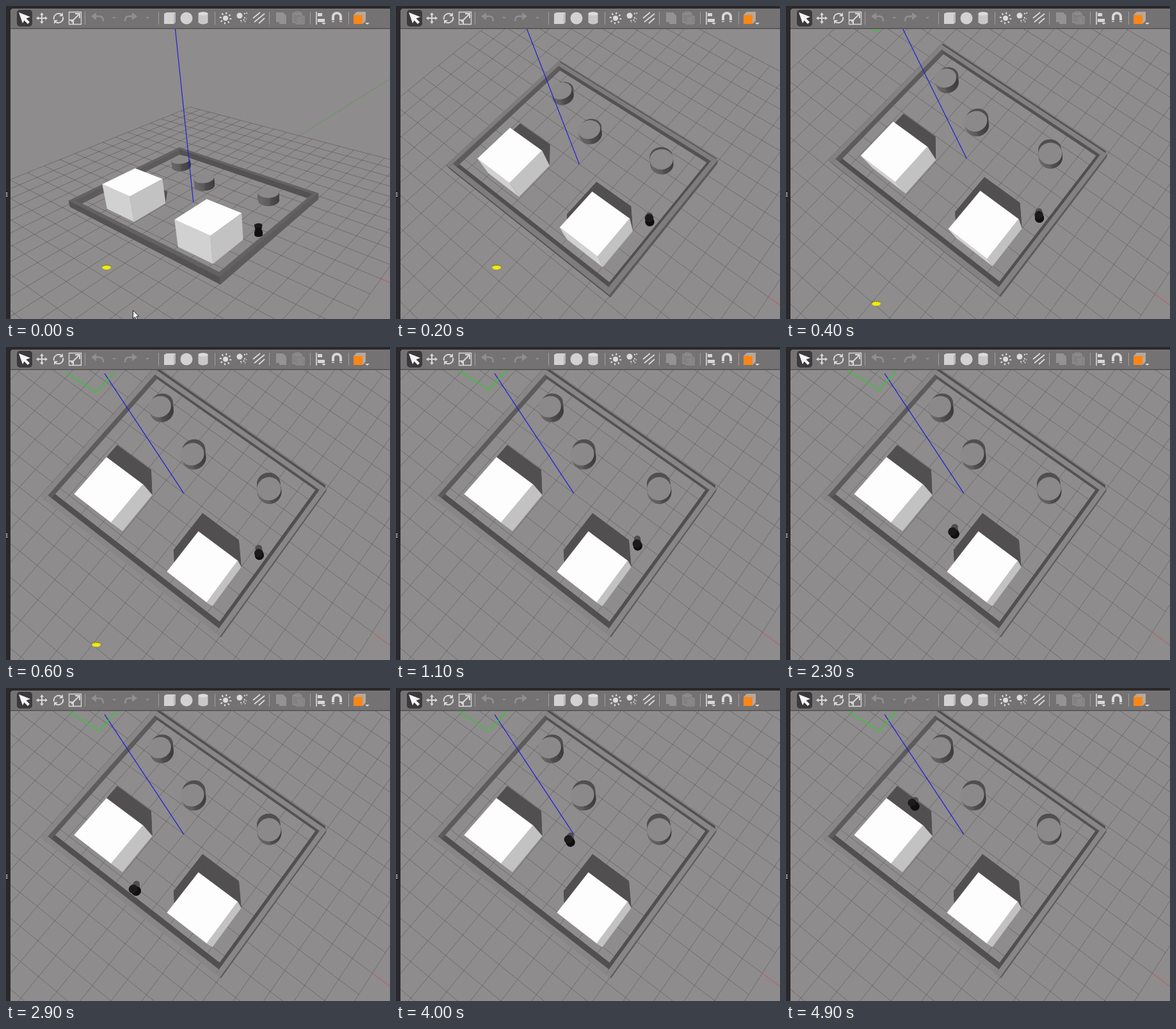
An HTML page with a canvas that plays this animation: 600 by 488 pixels, repeating every 5000 ms.

```html
<!DOCTYPE html>
<html lang="en">
<head>
<meta charset="utf-8">
<title>Robot in a walled arena</title>
<style>
html, body { margin: 0; width: 100%; height: 100%; overflow: hidden; background: #8e8c8c; }
canvas, svg { position: absolute; left: 0; top: 0; width: 600px; height: 488px; display: block; }
</style>
</head>
<body>
<canvas id="view" width="600" height="488"></canvas>
<svg viewBox="0 0 600 488" fill="none">
  <path d="M0 0H600V4H12Q7 4 7 9V488H0Z" fill="#2b282c"/>
  <path d="M7 35V9Q7 4 12 4H600V35Z" fill="#757273"/>
  <path d="M7 35.3H600" stroke="#555354" stroke-width="1.4"/>
  <path d="M0 291.5H2.5M0 294H2.5M0 296.5H2.5" stroke="#eee"/>
  <path d="M123.5 9V29M238.5 9V29M326.5 9V29M411.5 9V29M475.5 9V29M535.5 9V29" stroke="#a09e9f"/>
  <rect x="17" y="6" width="24" height="26" rx="5" fill="#3b393b"/>
  <path d="M20 10L38 17L31.500 19.500L37 25L34 28L28.500 22.500L26 27Z" fill="#f4f4f4"/>
  <g stroke="#d9d8d9" stroke-width="2">
    <path d="M56 12V26M49 19H63"/>
    <path d="M56 10l3 4h-6zM56 28l3-4h-6zM47 19l4-3v6zM65 19l-4-3v6z" fill="#d9d8d9" stroke="none"/>
    <path d="M75 21A7.500 7.500 0 0 1 87 13.500M89 17A7.500 7.500 0 0 1 77 24.500"/>
    <path d="M89 10v6h-6zM75 28v-6h6z" fill="#d9d8d9" stroke="none"/>
    <path d="M98.500 9.500H117.500V28.500H98.500Z" stroke-width="1.300"/>
    <path d="M102 25L114 13M108 12H115V19M99 22H105V28"/>
  </g>
  <g stroke="#918f90" stroke-width="2.500">
    <path d="M138 16H146Q152 16 152 24M200 16H192Q186 16 186 24"/>
    <path d="M133 16L141 10V22ZM205 16L197 10V22ZM166 17h6l-3 3zM218 17h6l-3 3z" fill="#918f90" stroke="none"/>
  </g>
  <path d="M247 12L251 10H265V25L262 28H247Z" fill="#d3d2d3"/>
  <path d="M262 13L265 10V25L262 28Z" fill="#b9b8b9"/>
  <circle cx="282" cy="19" r="9.500" fill="#d3d2d3"/>
  <path d="M300.500 12V26Q308 31 315.500 26V12Q308 7 300.500 12Z" fill="#c9c8c9"/>
  <ellipse cx="308" cy="12" rx="7.500" ry="2.700" fill="#dddcdd"/>
  <g stroke="#dddcdd" stroke-width="2">
    <circle cx="343" cy="19" r="4" fill="#dddcdd" stroke="none"/>
    <circle cx="343" cy="19" r="7.800" stroke-dasharray="2 4.126" stroke-width="3"/>
    <circle cx="365" cy="15" r="4.500" fill="#dddcdd" stroke="none"/>
    <path d="M372 12l5-1M372 18l4 2M367 22l1 4M371 21l3 4" stroke-dasharray="2 1.500"/>
    <path d="M386 19L397 10M388 25L404 12M395 27L404 19" stroke-width="1.700"/>
  </g>
  <path d="M422 10H433L438 15V28H427V25H422Z" fill="#949293"/>
  <path d="M448 11H462V16H466V28H453V26H448Z" fill="#838182" stroke="#969495"/>
  <path d="M452 9H459V13H452ZM455 19H463M455 22H463M455 25H463" stroke="#969495"/>
  <path d="M485 9V29" stroke="#e4e3e4" stroke-width="1.500"/>
  <path d="M487 11H494V16H487ZM487 20H498V25H487Z" fill="#d9d8d9"/>
  <path d="M493 26h7l-3.500 3zM561 26h7l-3.500 3z" fill="#d9d8d9"/>
  <path d="M511 25V17A6 6 0 0 1 523 17V25" stroke="#d9d8d9" stroke-width="4"/>
  <path d="M508 23H514M520 23H526" stroke="#757273" stroke-width="1.500"/>
  <path d="M543 14H557V28H543Z" fill="#fb8616"/>
  <path d="M543 14L548 9H562L557 14ZM557 14L562 9V23L557 28Z" fill="#b5a99e"/>
</svg>
<script>
const LOOP = 5000, STEP = 100;
const HX = 4.9, HY = 3.75;         // half size of the arena
const ORIGIN = -0.15, GRID = 10;
const SUN = [-0.78, 0.84];         // shadow offset per unit of height
const SHADE = '#514f4f';
const c = document.getElementById('view').getContext('2d');

// Camera keys: time, left/bottom/right/top arena corners, nadir y, height scale, rim grey
const cameras = [
  [0, 100, 313, 335, 434, 488, 301, 272, 228, 1805, -0.025, 100],
  [200, 83, 253, 335, 454, 502, 246, 256, 93, 668, -0.053, 126],
  [600, 60, 237, 336, 452, 500, 225, 235, 40, 488, -0.062, 136]
];
const NADIR_X = 450;

// Robot stops, in pixels of the settled view
const stops = [
  [0, 393, 329], [600, 396, 325], [900, 396, 325], [1700, 324, 267], [2900, 204, 317],
  [3300, 204, 317], [3500, 250, 345], [3600, 250, 345], [4000, 273, 241],
  [4100, 280, 216], [4580, 280, 216], [4900, 202, 185]
];

const boxes = [[-2.215, -1.85], [2.86, -2.03]];
const drums = [[-3.41, 2.4], [-0.79, 1.52], [2.89, 2.25]];

function track(keys, t) {
  let i = 0;
  while (i < keys.length - 2 && t >= keys[i + 1][0]) i++;
  const a = keys[i], b = keys[i + 1];
  const k = Math.min(1, (t - a[0]) / (b[0] - a[0]));
  return a.slice(1).map((v, n) => v + (b[n + 1] - v) * k);
}

// Maps the unit square onto the four arena corners, plus a column for height
function makeCamera([x0, y0, x1, y1, x2, y2, x3, y3, ny, s, rim]) {
  const dx1 = x1 - x2, dx2 = x3 - x2, sx = x0 - x1 + x2 - x3;
  const dy1 = y1 - y2, dy2 = y3 - y2, sy = y0 - y1 + y2 - y3;
  const det = dx1 * dy2 - dx2 * dy1;
  const g = (sx * dy2 - dx2 * sy) / det, h = (dx1 * sy - sx * dy1) / det;
  const a = x1 - x0 + g * x1, b = x3 - x0 + h * x3;
  const d = y1 - y0 + g * y1, e = y3 - y0 + h * y3;
  return {
    rim,
    project(X, Y, Z = 0) {
      const u = (X + HX) / (2 * HX), v = (Y + HY) / (2 * HY);
      const w = g * u + h * v + 1 + Z * s;
      return [(a * u + b * v + x0 + Z * s * NADIR_X) / w, (d * u + e * v + y0 + Z * s * ny) / w];
    },
    ground(x, y) {
      const p = a - g * x, q = b - h * x, r = d - g * y, k = e - h * y;
      const m = p * k - q * r, i = x - x0, j = y - y0;
      return [(i * k - q * j) / m * 2 * HX - HX, (p * j - r * i) / m * 2 * HY - HY];
    }
  };
}

const settled = makeCamera(cameras[2].slice(1));
let cam = settled;

function trace(points, close) {
  c.beginPath();
  points.forEach(p => c.lineTo(p[0], p[1]));
  if (close) c.closePath();
}
function fill(points, color) {
  trace(points, true);
  c.fillStyle = color;
  c.fill();
}
function stroke(points, color, width = 1) {
  trace(points);
  c.strokeStyle = color;
  c.lineWidth = width;
  c.stroke();
}
const line = (a, b, color, width) => stroke([cam.project(...a), cam.project(...b)], color, width);

function facing(q) {
  const [p0, p1, p2, p3] = q;
  return (p2[0] - p0[0]) * (p3[1] - p1[1]) - (p2[1] - p0[1]) * (p3[0] - p1[0]) < 0;
}

const rect = (x0, y0, x1, y1) => [[x0, y0], [x1, y0], [x1, y1], [x0, y1]];
const square = ([x, y]) => rect(x - 1, y - 0.98, x + 1, y + 0.98);
function ring([x, y], r, n = 32) {
  return Array.from({ length: n }, (_, i) => {
    const a = i / n * Math.PI * 2;
    return [x + r * Math.cos(a), y + r * Math.sin(a)];
  });
}

function shadow(base, height) {
  const cast = p => cam.project(p[0] + SUN[0] * height, p[1] + SUN[1] * height);
  const low = base.map(p => cam.project(...p)), far = base.map(cast);
  fill(far, SHADE);
  low.forEach((p, i) => {
    const j = (i + 1) % low.length;
    fill([p, low[j], far[j], far[i]], SHADE);
  });
}

function prism(base, height, top, side) {
  const low = base.map(p => cam.project(...p));
  const high = base.map(p => cam.project(p[0], p[1], height));
  low.forEach((p, i) => {
    const j = (i + 1) % low.length;
    const quad = [p, low[j], high[j], high[i]];
    if (!facing(quad)) return;
    const ex = base[j][0] - base[i][0], ey = base[j][1] - base[i][1], len = Math.hypot(ex, ey);
    const color = side(ey / len, -ex / len);
    fill(quad, color);
    stroke([...quad, p], color, 0.4);
  });
  fill(high, top);
}

const grey = v => `rgb(${v},${v - 2},${v - 2})`;
const wallSide = nx => nx > 0.5 ? '#5d5b5b' : '#545252';
const boxSide = (nx, ny) => nx > 0.5 ? '#c3c2c3' : ny < -0.5 ? '#d2d1d2' : '#999799';
const drumSide = (nx, ny) => grey(Math.round(90 - 12 * nx - 14 * ny - 10 * (nx + ny > 0)));

const T = 0.22, WALL = 0.25, DRUM = 0.33, RADIUS = 0.52;
const backWalls = [rect(-HX, -HY, -HX + T, HY), rect(-HX + T, HY - T, HX - T, HY)];
const frontWalls = [rect(-HX + T, -HY, HX - T, -HY + T), rect(HX - T, -HY, HX, HY)];

function drawGround() {
  const color = 'rgba(62,60,60,.44)';
  for (let i = -GRID; i <= GRID; i++) {
    line([ORIGIN + i, -GRID], [ORIGIN + i, GRID], color, 0.9);
    line([ORIGIN - GRID, i], [ORIGIN + GRID, i], color, 0.9);
  }
  line([ORIGIN + GRID, 0], [18, 0], '#c8525c', 1);
  line([ORIGIN, GRID], [ORIGIN, 40], 'rgba(80,150,80,.6)', 1);
}

function drawRobot(t) {
  const at = settled.ground(...track(stops, t));
  shadow(ring(at, 0.14, 16), 0.27);
  [[0, 0.19], [0.08, 0.19], [0.14, 0.16], [0.2, 0.14], [0.26, 0.16], [0.34, 0.18]].forEach(([z, r]) =>
    fill(ring(at, r, 20).map(p => cam.project(p[0], p[1], z)), z > 0.3 ? '#1c1b1c' : '#111011'));
}

function drawLightFrame(t) {
  if (t < 300) return;
  const k = t < 700 ? 1 : 0;
  const dx = -4 * k, dy = 4 * k - Math.max(0, 600 - t) * 0.15;
  stroke([[97, 36], [145, 67], [173, 36]].map(p => [p[0] + dx, p[1] + dy]), '#22d422', 1.2);
}

function drawMarker(t) {
  if (t >= 700) return;
  const [x, y] = t < 300 ? [157, 407.5] : [141, 464];
  c.beginPath();
  c.ellipse(x, y, 6.8, 3.4, 0, 0, Math.PI * 2);
  c.fillStyle = '#f0ec06';
  c.fill();
  c.setLineDash([1.5, 1.5]);
  stroke([[x - 6, y - 2], [x - 2, y - 3.3], [x + 3, y - 3.3], [x + 6, y - 2]], '#6d6a10', 1.6);
  c.setLineDash([]);
}

function drawPointer() {
  const p = [[0, 0], [0, 13], [3, 10.3], [5, 15], [7.2, 14], [5.2, 9.5], [9, 9.2]]
    .map(([x, y]) => [x + 198.5, y + 474.5]);
  fill(p, '#fff');
  stroke([...p, p[0]], '#222', 1);
}

function draw(t) {
  cam = makeCamera(track(cameras, t));
  c.fillStyle = '#8e8c8c';
  c.fillRect(0, 0, 600, 488);
  drawGround();

  [...backWalls, ...frontWalls].forEach(w => shadow(w, WALL));
  boxes.forEach(b => shadow(square(b), 1));
  drums.forEach(d => shadow(ring(d, RADIUS), DRUM));

  const rim = grey(Math.round(cam.rim));
  backWalls.forEach(w => prism(w, WALL, rim, wallSide));
  drums.forEach(d => prism(ring(d, RADIUS), DRUM, '#8b8989', drumSide));
  drawRobot(t);
  boxes.forEach(b => prism(square(b), 1, '#fdfdfd', boxSide));
  frontWalls.forEach(w => prism(w, WALL, rim, wallSide));

  line([ORIGIN, 0, 0], [ORIGIN, 0, 6.8], '#211ddc', 1.2);
  drawLightFrame(t);
  drawMarker(t);
  if (t < 100) drawPointer();
}

const start = performance.now();
function tick() {
  const t = (performance.now() - start) % LOOP;
  draw(Math.floor(t / STEP) * STEP);
  requestAnimationFrame(tick);
}
tick();
</script>
</body>
</html>
```
